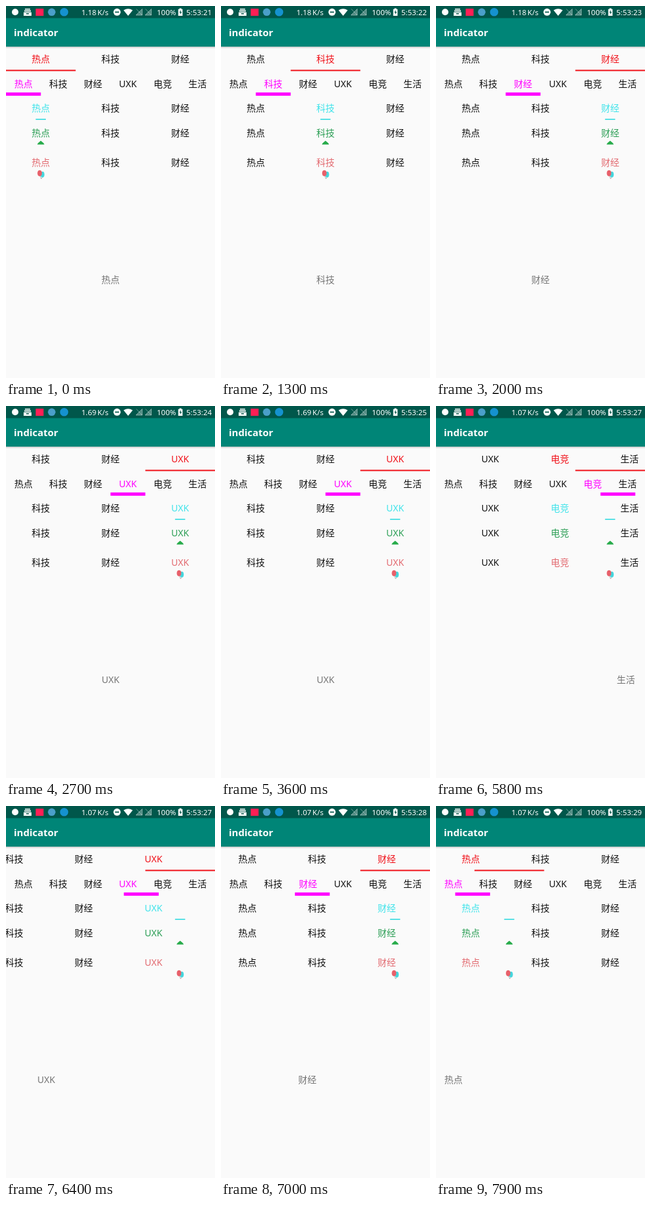
These frames come from a looping animation (320 by 568 pixels, 8000 ms). An HTML page:

```html
<!DOCTYPE html>
<html lang="zh-CN">
<head>
<meta charset="utf-8">
<title>indicator</title>
<style>
  html, body { margin: 0; width: 100%; height: 100%; overflow: hidden; background: #fafafa; }
  svg { display: block; width: 320px; height: 568px; overflow: hidden; }
  text { font: 14px "Noto Sans", "Noto Sans CJK SC", "Noto Sans CJK", sans-serif; }
  .mid { text-anchor: middle; }
  .status text { font-size: 11.5px; word-spacing: -1.2px; fill: #fff; }
  .title { font-size: 15px; font-weight: 700; fill: #fff; }
</style>
</head>
<body>
<svg viewBox="0 0 320 568">
  <defs>
    <linearGradient id="shade" x2="0" y2="1">
      <stop stop-color="#000" stop-opacity=".22"/>
      <stop offset="1" stop-color="#000" stop-opacity="0"/>
    </linearGradient>
  </defs>
  <rect width="320" height="568" fill="#fafafa"/>
  <g id="content"></g>
  <ellipse id="glow" cx="320" cy="418" ry="150" fill="#008577"/>

  <rect y="62" width="320" height="3" fill="url(#shade)"/>
  <rect width="320" height="62" fill="#008577"/>
  <rect width="320" height="18.5" fill="#00574b"/>
  <text class="title" x="12" y="46">indicator</text>

  <g class="status" fill="#fff">
    <circle cx="14" cy="9.3" r="5"/>
    <path d="M29 4h8v1.5h-8zM28 6.5h10v2H28zM27 9.5h12V15H27z"/>
    <path d="M31 11h4v1.5h-4z" fill="#00574b"/>
    <rect x="45.5" y="4" width="12" height="11" fill="#ff1f55"/>
    <circle cx="70" cy="9.3" r="5.8" fill="#4a9fc9"/>
    <circle cx="89" cy="9.3" r="6.3" fill="#1592cf"/>
    <text x="115.5" y="13.5" id="speed"></text>
    <circle cx="170" cy="9.3" r="5.5"/>
    <path d="M167 8.5h6v1.7h-6z" fill="#00574b"/>
    <path d="M180 6.5Q187 1.8 194 6.5L187 15z"/>
    <g fill-opacity=".3" stroke="#fff" stroke-opacity=".4">
      <path d="M208.5 4.5V14H199zM199.5 4.5l9 9.5"/>
      <path d="M222.5 4.5V14H213zM213.5 4.5l9 9.5"/>
    </g>
    <text x="231" y="13.5">100%</text>
    <path d="M265.5 3.5h3v1.2h1.8V15h-6.6V4.7h1.8z"/>
    <path d="M267.6 6l-2.2 4.3h1.5V13l2.2-4.1h-1.5z" fill="#00574b"/>
    <text x="276" y="13.5" id="clock"></text>
  </g>
</svg>
<script>
const LOOP = 8000, STEP = 100, LAG = 16;
const WIDTH = 320, WIDE = WIDTH / 3, NARROW = WIDTH / 6;
const PAGES = ['热点', '科技', '财经', 'UXK', '电竞', '生活'];
const $ = id => document.getElementById(id);

function add(parent, tag, attrs, text) {
  const el = document.createElementNS('http://www.w3.org/2000/svg', tag);
  for (const key in attrs) el.setAttribute(key, attrs[key]);
  if (text) el.textContent = text;
  return parent.appendChild(el);
}
const moveX = (el, x) => el.setAttribute('transform', `translate(${x.toFixed(2)} 0)`);
const clamp = u => Math.max(0, Math.min(1, u));

// Swipes as start, duration and page reached; one springs back halfway.
const swipes = [
  [850, 450, 1], [1430, 550, 2], [2130, 550, 3],
  [2850, 400, 3.28], [3250, 350, 3],
  [3740, 380, 4], [4334, 297, 5],
  [5722, 247, 4], [6219, 395, 3], [6720, 450, 2], [7180, 400, 1], [7803, 242, 0]
];
// Picks up under the finger, then settles.
const ease = u => 1 - (1 - u * u) ** 5;
const position = t => swipes.reduce(
  (pos, [start, time, to]) => pos + (to - pos) * ease(clamp((t - start) / time)), 0);

// Each marker is drawn for the first tab and slides from there.
const rows = [
  { y: 86.4, tab: WIDE, color: '#f01018',
    mark: g => add(g, 'rect', { y: 97.4, width: WIDE, height: 2, fill: '#f0141c' }) },
  { y: 124, tab: NARROW, color: '#ff00ff',
    mark: g => add(g, 'rect', { y: 132, width: NARROW, height: 5, fill: '#ff00ff' }) },
  { y: 161.2, tab: WIDE, color: '#3fe3ea',
    mark: g => add(g, 'rect', { x: 45.5, y: 172.2, width: 15.5, height: 1.7, fill: '#3fdce2' }) },
  { y: 198.6, tab: WIDE, color: '#2b9e55',
    mark: g => add(g, 'path', { d: 'M48 211.5Q48 210 50 208.5L53.3 205.8L56.6 208.5Q58.6 210 58.6 211.5z', fill: '#27ab4a' }) },
  { y: 244.4, tab: WIDE, color: '#e26a70',
    mark: g => {
      add(g, 'path', { d: 'M52 259L54 264L56 261', fill: 'none', stroke: '#888', 'stroke-width': .6 });
      add(g, 'ellipse', { cx: 55.8, cy: 257.3, rx: 3, ry: 4.5, fill: '#45d5dc' });
      add(g, 'ellipse', { cx: 51.6, cy: 255.3, rx: 3.4, ry: 4.6, fill: '#e8606a' });
    } }
];

const content = $('content');
const label = (g, text, x, y, fill) => add(g, 'text', { class: 'mid', x, y, fill }, text);

for (const row of rows) {
  row.strip = add(content, 'g');
  row.labels = PAGES.map((name, i) => label(row.strip, name, (i + .5) * row.tab, row.y, '#111'));
  row.marker = add(content, 'g');
  row.mark(row.marker);
}
const pager = add(content, 'g');
PAGES.forEach((name, i) => label(pager, name, (i + .5) * WIDTH, 423, '#757575'));

function draw(t) {
  const pos = position(t), tabPos = position(t - LAG);
  // The next tab lights up early in the direction of travel.
  const chosen = Math.floor(pos + (pos < tabPos ? .3 : .7));

  moveX(pager, -pos * WIDTH);
  for (const row of rows) {
    const scroll = row.tab === WIDE ? Math.max(0, tabPos - 2) * WIDE : 0;
    moveX(row.strip, -scroll);
    moveX(row.marker, tabPos * row.tab - scroll);
    row.labels.forEach((el, i) => el.setAttribute('fill', i === chosen ? row.color : '#111'));
  }

  // Edge glow when pulling past the last page.
  const pull = Math.sin(clamp((t - 4900) / 600) * Math.PI);
  $('glow').setAttribute('rx', 18 * pull);
  $('glow').setAttribute('opacity', .14 * pull);

  $('clock').textContent = '5:53:' + (21 + Math.floor((t + 400) / 1000));
  $('speed').textContent = ['1.18', '1.69', '1.07'][Math.floor((t + 400) / 3000)] + ' K/s';
}

function tick() {
  draw(Math.floor(performance.now() % LOOP / STEP) * STEP);
  requestAnimationFrame(tick);
}
tick();
</script>
</body>
</html>
```
